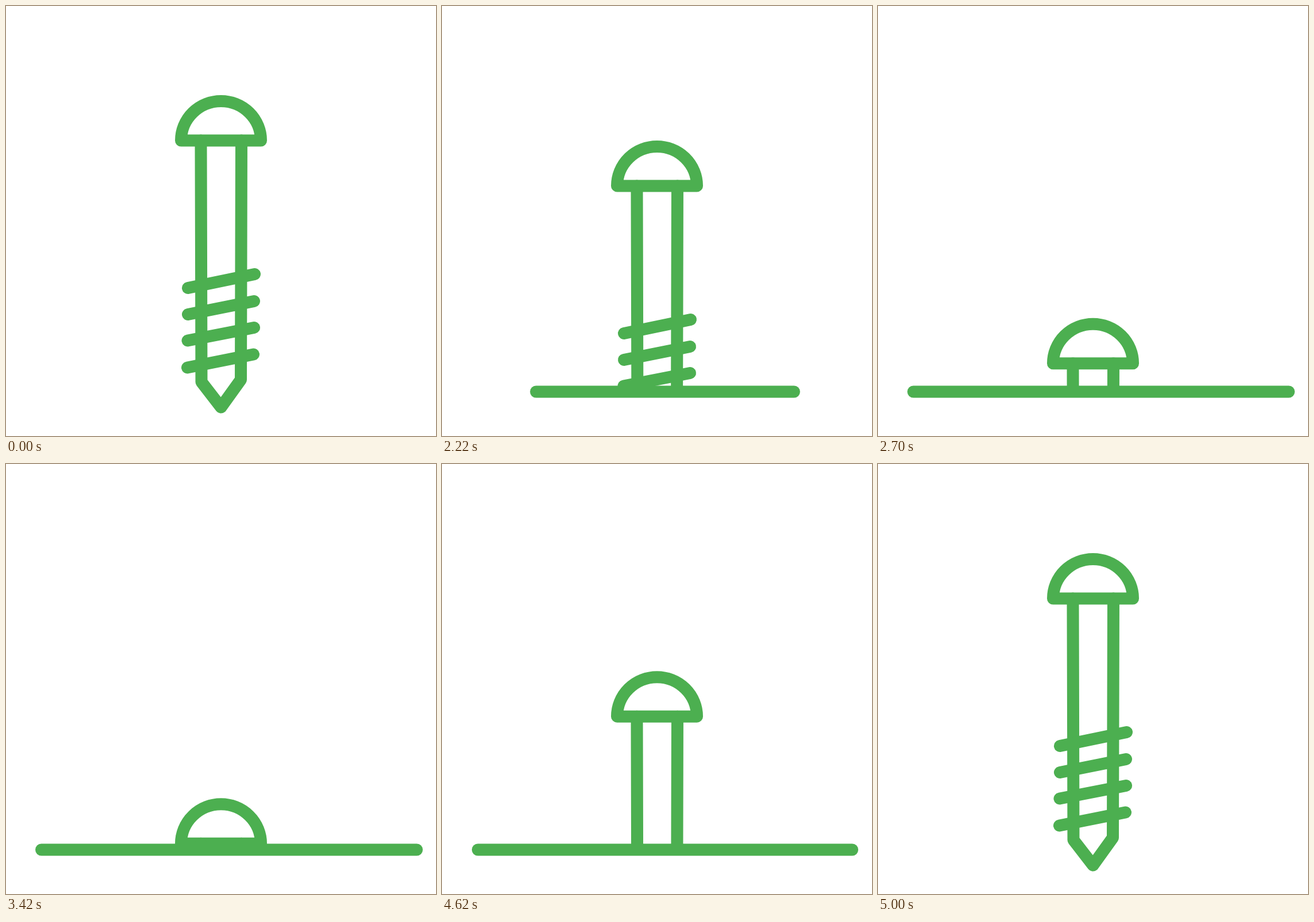
Animation of 748x748 px, one loop 5.05 s. Source, as an HTML page:

```html
<!DOCTYPE html>
<html lang="en">
<head>
<meta charset="utf-8">
<title>Screw</title>
<style>
  html, body { margin: 0; width: 100%; height: 100%; overflow: hidden; background: #fff; }
  svg { display: block; width: 100%; height: 100%; }
  .ink { fill: none; stroke: #4caf50; stroke-width: 21; stroke-linecap: round; stroke-linejoin: round; }
</style>
</head>
<body>
<svg viewBox="0 0 748 748">
  <g id="screw" class="ink">
    <path d="M304.5 234A69.5 68.5 0 0 1 443.5 234Z"/>
    <path d="M339 234L340 654L374 698L408.5 650L409.5 234"/>
    <path d="M316.5 490.5L432.5 466.5M316.5 536.5L431.5 513.5M316 582L431.5 559.5M315.5 629L430.5 606"/>
  </g>
  <g id="ground">
    <rect id="cover" y="671" height="77" fill="#fff"/>
    <path id="line" class="ink"/>
  </g>
</svg>
<script>
  const LOOP = 5050, DEPTH = 426.3, MID = 388, HALF = 326.5, GROUND = 671;
  const byId = id => document.getElementById(id);
  const screw = byId('screw'), ground = byId('ground'), cover = byId('cover'), line = byId('line');

  // Cubic easing with control points (x1, 0) and (x2, 1)
  const ease = (x1, x2) => x => {
    if (x <= 0) return 0;
    if (x >= 1) return 1;
    let lo = 0, hi = 1, u;
    for (let i = 0; i < 30; i++) {
      u = (lo + hi) / 2;
      const at = 3 * u * (1 - u) ** 2 * x1 + 3 * u * u * (1 - u) * x2 + u ** 3;
      if (at < x) lo = u; else hi = u;
    }
    return u * u * (3 - 2 * u);
  };
  const drive = ease(0.336, 0.356);
  const extend = ease(0.21, 0.45);
  const retract = ease(0.7, 0.8);

  // 40 poses per second, with the half ticks falling 5 ms early
  const tick = t => Math.floor(t / 50) * 50 + (t % 50 >= 20 ? 25 : 0);

  function draw(now) {
    const t = tick(now % LOOP);
    const depth = t < 4000 ? drive((t - 2000) / 1000) : drive((5000 - t) / 1000);
    const grown = t < 4000 ? extend((t - 2000) / 450) : 1 - retract((t - 4600) / 400);
    const half = HALF * grown, reach = half + 23;

    screw.setAttribute('transform', `translate(0 ${DEPTH * depth})`);
    ground.setAttribute('visibility', grown > 0 ? 'visible' : 'hidden');
    cover.setAttribute('x', MID - reach);
    cover.setAttribute('width', 2 * reach);
    line.setAttribute('d', `M${MID - half} ${GROUND}H${MID + half}`);
  }

  const start = performance.now();
  function loop() {
    draw(performance.now() - start);
    requestAnimationFrame(loop);
  }
  loop();
</script>
</body>
</html>
```
